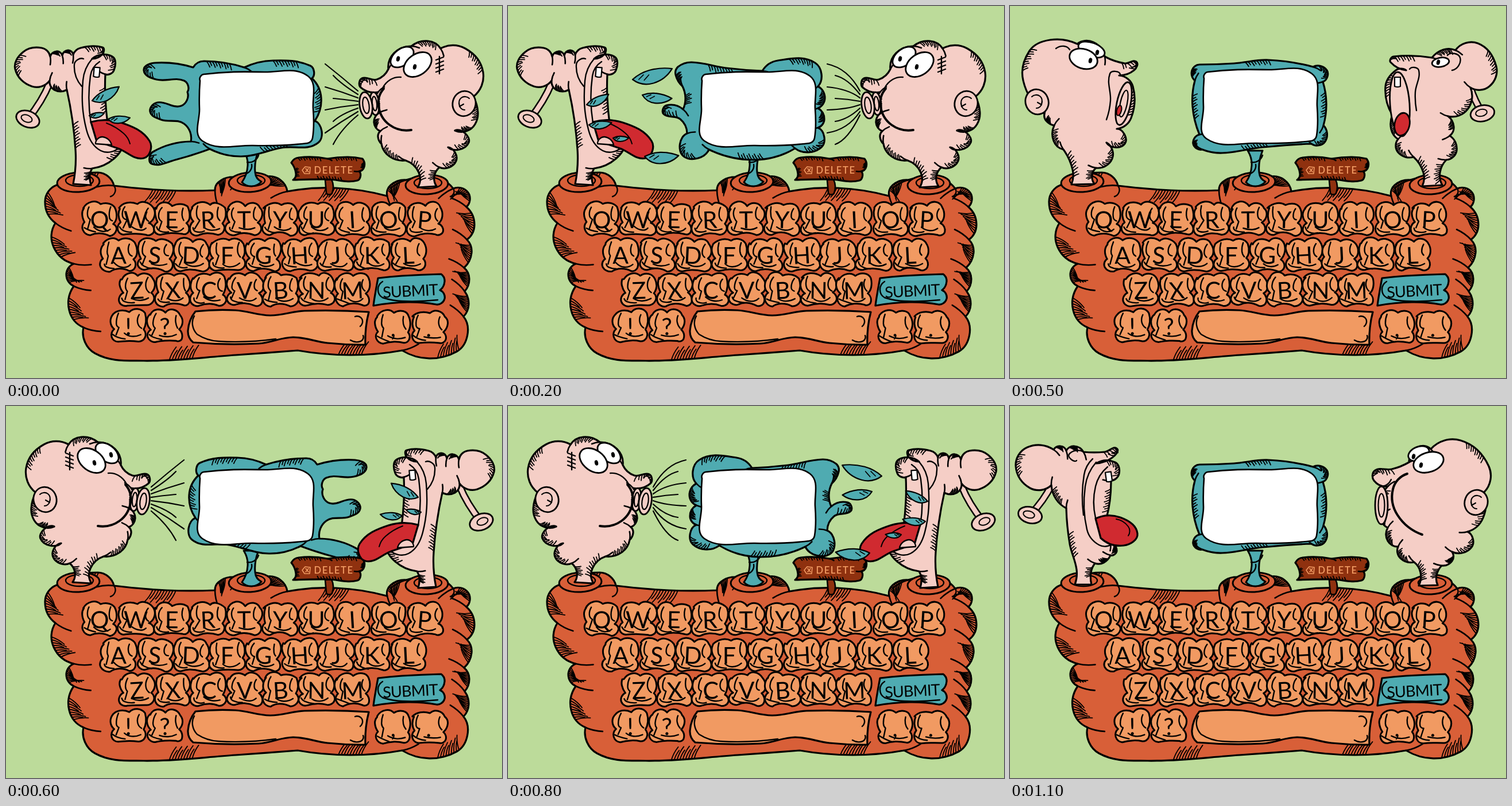
Animation, 864 px wide and 648 px high, one loop 1200 ms. Source, as an HTML page:

```html
<!DOCTYPE html>
<html lang="en">
<head>
<meta charset="utf-8">
<title>Blowing heads keyboard</title>
<style>
html, body { margin: 0; width: 100%; height: 100%; overflow: hidden; background: #bcdb9a; }
svg { display: block; width: 864px; height: 648px; }
path, ellipse { stroke: #000; stroke-linecap: round; stroke-linejoin: round; }
text { font-family: Lato, "Open Sans", sans-serif; text-anchor: middle; }
</style>
</head>
<body>
<svg id="stage" viewBox="0 0 864 648"></svg>
<script>
const SKIN = '#f5cec6', BODY = '#d85f38', KEY = '#f19a62', TEAL = '#4fabb1',
  RED = '#d02a30', BROWN = '#8f310f', WHITE = '#fff';
const rnd = n => { const v = Math.sin(n * 12.9898) * 43758.5453; return v - Math.floor(v) - 0.5; };
const unit = (a, b) => { const x = b[0] - a[0], y = b[1] - a[1], l = Math.hypot(x, y) || 1; return [x / l, y / l]; };

// "x y x y | x y": smooth runs of points, joined by sharp corners at the bars.
function runs(s) {
  let last = [];
  return s.split('|').map(part => {
    const n = part.trim().split(/\s+/).map(Number), p = [...last];
    for (let i = 0; i < n.length; i += 2) p.push([n[i], n[i + 1]]);
    last = [p[p.length - 1]];
    return p;
  }).filter(p => p.length > 1);
}

// Tangents at the ends mirror their neighbours, so three points make an arc.
function bend(p) {
  const t = p.map((q, i) => p[i - 1] && p[i + 1] ? unit(p[i - 1], p[i + 1]) : null);
  const end = (a, b, v) => {
    const u = unit(a, b);
    if (!v) return u;
    const k = 2 * (u[0] * v[0] + u[1] * v[1]);
    return [k * u[0] - v[0], k * u[1] - v[1]];
  };
  const z = p.length - 1;
  const first = end(p[0], p[1], t[1]), final = end(p[z - 1], p[z], t[z - 1]);
  t[0] = first;
  t[z] = final;
  return p.slice(1).map((c, i) => {
    const b = p[i], h = Math.hypot(c[0] - b[0], c[1] - b[1]) * 0.36;
    return `C${b.map((v, k) => v + t[i][k] * h)} ${c.map((v, k) => v - t[i + 1][k] * h)} ${c}`;
  }).join('');
}
const curve = s => { const r = runs(s); return 'M' + r[0][0] + r.map(bend).join(''); };
const path = (d, fill, w) => `<path d="${d}" fill="${fill}" stroke-width="${w}"/>`;
const blob = (s, fill = SKIN, w = 3.2) => path(curve(s) + 'Z', fill, w);
const ink = (s, w = 2.4) => path(s.split('/').map(curve).join(''), 'none', w);
const ball = (x, y, rx, ry, rot = 0, fill = SKIN, w = 2.8) =>
  `<ellipse rx="${rx}" ry="${ry}" fill="${fill}" stroke-width="${w}" transform="translate(${x} ${y}) rotate(${rot})"/>`;
const at = (transform, s) => `<g transform="${transform}">${s}</g>`;

// Fills an outline, then adds creases at its dents and hatching inside its edges.
const probe = document.createElementNS('http://www.w3.org/2000/svg', 'path');
function shaded(s, fill = SKIN, size = 10, crease = 14) {
  const parts = runs(s), all = parts.flat();
  const area = all.reduce((sum, a, i) => {
    const b = all[(i + 1) % all.length];
    return sum + a[0] * b[1] - b[0] * a[1];
  }, 0);
  const side = Math.sign(area);
  const pieces = parts.map(p => {
    probe.setAttribute('d', 'M' + p[0] + bend(p));
    const len = probe.getTotalLength();
    const spot = l => { const q = probe.getPointAtLength(l); return [q.x, q.y]; };
    return { len, spots: Array.from({ length: 9 }, (_, i) => {
      const l = len * 0.5 + (i - 4) * Math.min(5, len / 14);
      return [spot(l), unit(spot(l - 1), spot(l + 1))];
    }), end: spot(len), out: unit(spot(len - 1), spot(len)), into: unit(spot(0), spot(1)) };
  });
  let lines = '', dents = '';
  pieces.forEach((p, k) => {
    if (p.len > 26) p.spots.slice(0, p.len > 45 ? 9 : 6).forEach(([a, t], i) => {
      const l = size * (i % 2 ? 0.8 : 1.1);
      const x = (-t[1] * side * 0.85 + t[0] * 0.5) * l, y = (t[0] * side * 0.85 + t[1] * 0.5) * l;
      lines += `M${a}q${x / 2 + y * 0.1} ${y / 2 - x * 0.1} ${x} ${y}`;
    });
    const next = pieces[k + 1];
    if (next && (p.out[0] * next.into[1] - p.out[1] * next.into[0]) * side < -0.3) {
      const [x, y] = p.out.map(v => v * crease);
      dents += `M${p.end}q${x / 2} ${y / 2} ${x - y * side * 0.2} ${y + x * side * 0.2}`;
    }
  });
  return blob(s, fill) + path(dents, 'none', 2.6) + path(lines, 'none', 1.8);
}

// Parts of the face
const eye = (x, y, rx, ry, rot, px, py) => ball(x, y, rx, ry, rot, WHITE) + ball(px, py, 2.6, 4.2, 15, '#000', 1);
const tooth = (x, y, rot) => at(`translate(${x} ${y}) rotate(${rot})`, path('M-5-8L-5 8Q0 10 5 8L5-8Z', WHITE, 2.2));
const lips = (x, y, rx, ry, rot) => ball(x, y, rx, ry, rot) + ball(x, y, rx / 2, ry * 0.62, rot, 'none', 2.2);
const ear = (x, y, rot, flip) => ball(x, y, 20, 22, rot) +
  at(`translate(${x} ${y}) scale(${flip} 1)`, ink('9 -9 -5 -10 -8 4 1 11/-1 1 -8 5', 2.2));
const scar = (x, y) => path(`M${x} ${y}v30` + [4, 11, 18, 25].map(d => `M${x - 6} ${y + d + 2}l13-5`).join(''), 'none', 2.4);
function dangle(x1, y1, x2, y2, rot) {
  const d = `M${x1} ${y1}Q${(x1 * 2 + x2) / 3} ${(y1 + y2) / 2} ${x2} ${y2}`;
  return path(d, 'none', 13) + `<path d="${d}" fill="none" style="stroke:${SKIN}" stroke-width="8"/>` +
    ball(x2, y2, 21, 14, rot) + ball(x2 - 2, y2 - 1, 10, 6, rot, 'none', 2);
}

const suckHead = dangle(76, 134, 38, 197, 22) +
  shaded('117 310 | 121 250 106 146 | 84 146 76 130 | 45 140 16 110 30 80 62 73 77 88 | 88 79 98 86 | 108 77 117 85 | 130 73 168 72 168 84 150 92 | 185 88 188 112 173 119 | 173 160 177 205 | 203 237 188 266 150 283 | 146 295 148 312') +
  ink('150 92 134 130 140 215 165 252 198 245/163 97 147 122 148 204/135 92 119 102 132 140') + tooth(158, 115, 5) +
  blob('148 202 200 203 250 235 240 265 195 248 158 236 | 148 202', RED) + ink('175 204 205 222 216 240', 2) +
  blob('156 240 168 228 184 242', SKIN, 2.3);

const blowHead =
  shaded('717 316 | 719 290 696 269 | 668 262 654 240 | 648 228 652 218 | 641 203 650 186 | 642 168 648 150 | 618 142 620 126 646 128 666 110 | 676 82 706 70 | 735 61 757 74 | 800 74 831 115 814 158 | 822 185 817 206 | 802 218 782 217 | 806 238 770 246 | 784 270 755 281 | 746 297 750 314') +
  eye(690, 89, 23, 14, -38, 683, 92) + eye(717, 102, 27, 18, -36, 712, 106) + ear(798, 170, 15, 1) + scar(755, 88) +
  lips(642, 170, 8, 20, -6) + lips(627, 173, 11, 23, -8) +
  ink('658 144 649 175 668 207 706 216', 4) + ink('656 143 670 128 688 124');

const gapeLeft = dangle(72, 138, 35, 190, 15) +
  shaded('113 311 | 116 285 104 240 98 178 | 80 162 72 138 | 35 143 10 105 30 72 76 76 | 88 70 98 78 | 112 70 128 80 | 165 80 186 74 178 90 150 100 | 183 98 190 118 176 130 | 174 165 168 195 | 175 238 | 186 252 175 260 | 163 273 148 274 | 141 290 142 311') +
  ink('150 98 131 140 134 215 155 242 178 240/170 106 149 140 149 195/128 80 103 84 116 95/144 92 129 120 128 190') + tooth(172, 123, -8) +
  blob('149 196 192 194 222 222 198 243 158 230 | 149 196', RED) + ink('185 197 206 210 206 226', 2);

const pursed =
  shaded('712 313 | 715 290 704 272 | 680 265 676 245 | 658 235 658 212 | 647 200 650 188 | 648 160 658 140 | 634 130 636 112 665 110 695 98 | 710 72 733 75 | 785 60 834 105 826 150 | 824 195 797 219 | 804 246 770 254 | 770 270 752 278 | 743 295 745 312') +
  eye(712, 83, 19, 12, -22, 703, 88) + eye(729, 98, 27, 17, -18, 716, 103) + ear(812, 168, 20, 1) +
  lips(647, 173, 11, 33, 0) + ink('692 118 667 145 675 190 718 224', 4) + ink('650 140 658 136 664 128');

const agape =
  shaded('107 311 | 109 285 93 250 | 76 235 77 208 | 63 200 60 188 | 23 130 34 78 70 59 117 66 | 145 63 165 88 | 200 100 220 97 216 112 190 121 | 214 140 211 195 186 214 | 200 240 168 238 | 178 266 150 282 | 143 295 147 310') +
  eye(142, 76, 24, 12, 20, 152, 81) + eye(128, 92, 25, 17, 18, 140, 95) + ear(47, 167, -20, -1) +
  lips(198, 170, 12, 38, 12) + ball(190, 182, 4, 9, 15, RED, 2) +
  ink('192 119 174 118 175 165 168 198/80 74 94 70 104 76');

const gapeRight = dangle(802, 142, 823, 187, -12) +
  shaded('718 314 | 720 290 703 263 | 676 255 676 232 | 664 215 666 190 | 654 140 672 112 690 112 | 663 98 668 88 735 90 | 755 76 776 77 | 815 65 847 105 835 140 802 142 | 797 180 763 192 | 773 210 766 226 | 778 252 760 268 | 749 290 753 312') +
  ball(679, 171, 17, 56, -4) + ball(683, 206, 13, 20, 12, RED) + tooth(675, 132, 0) + eye(750, 98, 15, 8, -10, 746, 98) +
  ink('696 110 712 112 706 150 708 182/762 86 784 90 770 112');

// Monitor
const screen = blob('338 126 344 115 450 111 526 118 535 175 534 226 525 235 430 239 342 231 337 175 338 126', WHITE, 2.6);
const stand = blob('414 252 421 278 411 307 | 428 314 445 306 | 434 290 440 252', TEAL, 3) +
  ink('420 272 432 270 440 260/418 292 426 286 428 276');
const calm = shaded('330 102 | 390 100 450 94 528 106 | 552 112 545 132 | 551 170 546 208 | 549 236 525 240 | 440 246 370 256 335 250 | 319 240 330 224 | 318 175 322 130 | 317 112 330 102', TEAL, 9);
const arms = shaded('326 107 | 345 96 415 107 | 465 95 530 104 533 126 | 549 160 538 200 | 544 238 480 247 410 262 355 249 | 295 268 254 275 256 254 322 236 | 310 205 270 198 251 184 264 168 305 174 316 150 | 310 130 262 128 240 112 260 99 326 107', TEAL, 11);
const splash = shaded('296 106 | 320 98 380 108 443 113 | 470 95 535 99 540 140 | 552 160 540 178 | 551 197 540 212 | 546 246 500 248 | 430 268 350 250 | 306 262 312 222 | 300 197 271 188 276 173 305 180 | 309 160 304 140 | 292 120 296 106', TEAL, 11);

const drop = (x, y, s, rot) => at(`translate(${x} ${y}) rotate(${rot}) scale(${s})`,
  blob('0 0 22 -12 51 -14 | 26 5 0 0', TEAL, 2.2 / s) + ink('8 0 14 -6/15 1 21 -6', 1.6 / s));
const drops = [
  [[150, 165, 1, -12], [145, 191, 0.5, 6], [178, 197, 0.72, 12]],
  [[143, 168, 0.9, -11], [143, 199, 0.6, 8], [180, 214, 0.6, 14]],
  [[137, 172, 0.8, -10], [141, 207, 0.75, 10], [183, 230, 0.52, 15], [217, 128, 1.35, 0], [234, 155, 0.98, 22], [238, 262, 1.12, 14]]
].map(list => list.map(d => drop(...d)).join(''));

function gust(bow) {
  let d = '';
  for (let i = 0; i < 8; i++) {
    const k = i - 3;
    d += `M${556 + (i % 2) * 14} ${161 + k * 20}Q${584 + bow} ${162 + k * 13 + k * bow * 0.6} 613 ${166 + k * 6}`;
  }
  return path(d, 'none', 2.2);
}

// Keyboard
const collar = (x, y) => ball(x, y, 37, 17, -3, BODY, 3) + ball(x + 2, y - 3, 24, 10, 0, BODY, 2.4);
const body = shaded('88 312 | 68 340 86 378 | 83 420 118 449 | 105 468 118 488 | 110 530 135 560 | 155 605 240 618 400 608 508 600 | 600 608 690 600 | 785 602 797 541 | 806 520 799 497 | 807 475 798 456 | 811 430 803 407 | 816 380 802 350 | 805 325 779 318 | 750 300 697 303 | 670 312 664 331 | 575 317 490 323 | 478 303 455 297 | 390 298 | 370 307 364 321 | 280 321 188 313 | 160 290 88 312', BODY, 24, 30) +
  ink('188 313 190 324 182 332/779 318 780 326 774 332') + collar(126, 307) + collar(425, 307) + collar(733, 311);
const sign = blob('556 303 558 326 | 568 326 567 302', BROWN, 2.6) +
  shaded('497 273 | 510 264 560 266 | 595 263 621 266 | 624 280 615 288 | 612 304 560 302 500 303 | 505 292 497 273', BROWN, 6, 8) +
  `<path d="M516 286l5-6 9 1-1 11-9 0zm6-3 5 6m0-6-5 6" fill="none" style="stroke:${KEY}" stroke-width="1.6"/>` +
  `<text x="571" y="292" font-size="16.5" font-weight="600" letter-spacing="1.6" fill="${KEY}">DELETE</text>`;

const rows = [['QWERTYUIOP', 163, 372, 62.9], ['ASDFGHJKL', 196, 434, 63.1], ['ZXCVBNM', 228, 495, 62.6], ['!?', 213, 558, 64], [',.', 674, 561, 63]];
const keyEdge = '-27 -20 | -14 -29 2 -25 | 16 -29 28 -21 | 31 -6 25 6 | 30 20 18 27 | 0 24 -16 27 | -30 20 -25 5 | -30 -8 -27 -20';
const keyFold = '-17 -22 -21 -6 -16 2 | -21 16/-8 14 6 19 20 15/20 -20 17 -6 22 2/-26 14 -20 20 -6 22';
function keys(phase) {
  let out = '', seed = 0;
  for (const [chars, x, y, step] of rows) {
    [...chars].forEach((ch, i) => {
      seed += 3;
      const wobble = s => {
        let k = seed;
        return s.replace(/-?\d+/g, v => (+v + rnd(++k * 7) * 4 + rnd(k + phase * 91) * 1.2).toFixed(1));
      };
      out += at(`translate(${x + i * step} ${y})`, blob(wobble(keyEdge), KEY, 3) + ink(wobble(keyFold)) +
        `<text y="15" font-size="41" transform="rotate(${rnd(seed) * 8 + rnd(seed + phase) * 2})">${ch}</text>`);
    });
  }
  return out +
    blob('330 532 | 400 530 460 539 520 531 632 533 | 627 560 626 590 | 560 587 500 577 440 588 326 586 | 317 565 330 532', KEY) +
    ink('328 540 325 556 333 572 | 370 584 470 580/608 541 620 545 617 558/600 582 618 584 622 574') +
    blob('648 474 | 690 470 758 467 | 764 480 756 495 | 764 510 750 520 | 700 516 640 522 | 642 508 648 474', TEAL) +
    ink('656 480 648 494 656 508 | 690 514 752 512') +
    '<text x="704" y="506" font-size="27" letter-spacing="-.8" transform="rotate(-3 704 496)">SUBMIT</text>';
}

// Scenes
const mirror = (width, dy, s) => at(`translate(${width} ${dy}) scale(-1 1)`, s);
const nod = (x, y, s) => at(`rotate(2 ${x} ${y})`, s);

function blowScene(phase, flip) {
  const splat = phase < 2 ? arms : splash;
  const blow = blowHead + gust(phase * 4);
  return flip
    ? mirror(868, -5, splat) + screen + sign + mirror(866, -7, blow) + mirror(866, 5, suckHead) + mirror(868, -6, drops[phase])
    : splat + at('translate(0 4)', screen) + sign + blow + suckHead + drops[phase];
}
const restScene = step => calm + screen + sign + [
  gapeLeft + pursed,
  nod(128, 308, gapeLeft) + nod(732, 312, pursed),
  agape + gapeRight
][step];

function cel(i) {
  const phase = i % 3, act = Math.floor(i / 3);
  const scene = act % 2 ? restScene(act === 1 ? phase : 2 - phase) : blowScene(phase, act === 2);
  return `<g visibility="hidden">${body}${stand}${keys(phase)}${scene}</g>`;
}

const stage = document.getElementById('stage');
stage.innerHTML = Array.from({ length: 12 }, (_, i) => cel(i)).join('');
const cels = [...stage.children];
let shown = -1;
function tick() {
  const i = Math.floor(performance.now() / 100) % 12;
  if (i !== shown) {
    if (shown >= 0) cels[shown].setAttribute('visibility', 'hidden');
    cels[i].setAttribute('visibility', 'visible');
    shown = i;
  }
  requestAnimationFrame(tick);
}
tick();
</script>
</body>
</html>
```
